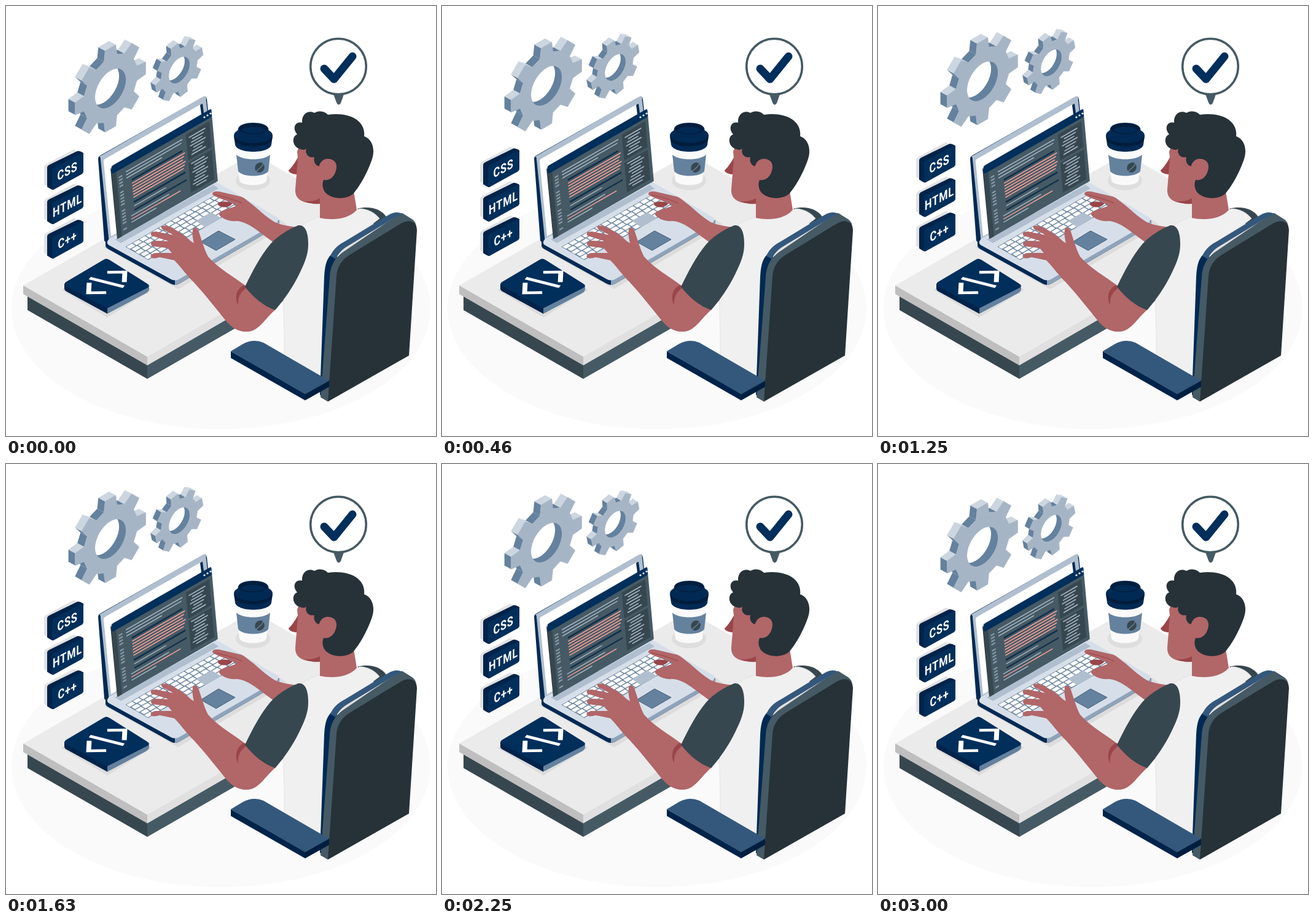
Recreate the animation shown at these times as an HTML page. Size 700 by 700 pixels, loop 3040 ms.

```html
<!DOCTYPE html>
<html lang="en">
<head>
<meta charset="utf-8">
<title>Coding at the desk</title>
<style>
html, body { margin: 0; width: 100%; height: 100%; overflow: hidden; background: #fff; }
svg { display: block; width: 100vw; height: 100vh; }
text { font: 700 21px Roboto, Arial, sans-serif; letter-spacing: 1px; text-anchor: middle; fill: #fff; }
</style>
</head>
<body>
<svg viewBox="0 0 700 700">
  <ellipse cx="350" cy="492" rx="341" ry="197" fill="#fafafa"/>

  <g id="desk">
    <path fill="#37474f" d="M35 470L230 580V607L35 495Z"/>
    <path fill="#455a64" d="M230 580L470 440V469L230 607Z"/>
    <path fill="#ebebeb" d="M28 455L402 240L604 356L230 572Z"/>
    <path fill="#bfbfbf" d="M28 455L230 571V585L28 469Z"/>
    <path fill="#e0e0e0" d="M230 571L604 355V369L230 585Z"/>
  </g>

  <g id="cup">
    <ellipse cx="402" cy="284" rx="28" ry="16" fill="#dedede"/>
    <path fill="#fafafa" d="M373 225L380 284C383 294 421 294 424 284L431 225Z"/>
    <path fill="#64819e" d="M375 242C385 252 420 252 430 242L427 269C420 279 385 279 378 269Z"/>
    <ellipse cx="413" cy="263" rx="7.5" ry="8.5" fill="#37474f" transform="rotate(30 413 263)"/>
    <path d="M407 270C411 264 414 266 419 257" fill="none" stroke="#64819e" stroke-width="1.5"/>
    <path fill="#002a54" d="M371 211C371 193 434 193 434 211L432 226C428 241 377 241 373 226Z"/>
    <path fill="#001d3c" d="M371 211C377 227 428 227 434 211L433 218C427 232 378 232 372 218Z"/>
    <path fill="#002a54" d="M376 211L378 199C382 187 423 187 427 199L429 211C425 221 380 221 376 211Z"/>
    <ellipse cx="402.500" cy="200" rx="23" ry="9" fill="#001d3c"/>
    <path fill="#002a54" d="M383 202C388 195 417 195 422 202C418 209 388 209 383 202Z"/>
  </g>

  <g id="laptop">
    <path fill="#dcdcdc" d="M158 392L280 461L458 357L440 343Z"/>
    <path fill="#002a54" d="M150 249Q150 245 154 243L321 148Q326 146 327 152L342 290L166 388L160 382Z"/>
    <path fill="#b0bfcf" d="M154 250Q153 247 157 245L320 151Q325 149 326 155L341 290L168 386Z"/>
    <path fill="#b0bfcf" d="M152 245L320 148Q326 146 326 152L323 155L156 250Z"/>
    <path fill="#fff" d="M159 254Q158 251 161 249L317 160L334 285L171 375Z"/>
    <path fill="#002a54" d="M316 161L320 159L323 182L319 184Z"/>
    <path fill="#002a54" d="M162 384V391Q163 394 167 396L268 452Q275 456 282 452L440 360Q445 357 445 349Z"/>
    <path fill="#8fa3b9" d="M275 443V454Q279 454 282 452L440 360Q445 357 445 349Z"/>
    <path fill="#d6dfe9" d="M168 379L337 288Q342 286 347 289L440 343Q447 348 440 353L283 444Q275 449 267 444L167 389Q162 385 168 379Z"/>
    <path fill="#b0bfcf" d="M177 380L338 291L346 297L187 386Z"/>
    <g id="keys" transform="matrix(.866 -.5 .866 .5 196 392)"><rect x="-1" y="-1" width="173" height="43" fill="#7189a3"/></g>
    <path fill="#b0bfcf" d="M309 350L334 336L350 345L324 360Z"/>
    <path fill="#64819e" stroke="#455f7a" d="M317 384L346 366L373 380L342 398Z"/>
    <path fill="#263238" d="M170 264L175 268L185 376L181 379Z"/>
    <g id="screen" transform="matrix(1 -.577 .09 1 172 270)">
      <rect width="163" height="109" fill="#455a64"/>
      <rect y="-9" width="163" height="13" rx="3" fill="#002f5c"/>
    </g>
    <g fill="#fff"><circle cx="323" cy="181" r="1.600"/><circle cx="328" cy="178" r="1.600"/><circle cx="333" cy="175" r="1.600"/></g>
  </g>

  <g id="tile">
    <path fill="#dcdcdc" d="M90 462L165 416L238 462L165 507Z"/>
    <path fill="#00234a" d="M95 452V460Q95 463 99 465L165 501V485Z"/>
    <path fill="#64819e" d="M165 491L233 453V461Q233 464 229 467L165 501Z"/>
    <path fill="#002f5c" d="M98 449L159 413Q163 410 168 413L230 452Q235 456 230 459L165 492L98 456Q93 452 98 449Z"/>
    <path transform="matrix(.866 -.5 .866 .5 164 450)" d="M-17 -16L-34 0L-17 16M-9 -23L9 23M17 -16L34 0L17 16" fill="none" stroke="#fff" stroke-width="6.500"/>
  </g>

  <g id="floating"></g>

  <g id="person">
    <path fill="#b16668" d="M490 362C466 359 452 358 440 353C424 345 406 326 398 321C391 315 386 311 381 310L347 302Q335 301 336 307Q344 313 366 319L375 325C365 330 355 331 349 335Q344 339 350 343C356 348 366 351 374 350C386 350 398 357 410 366L437 386L470 400Z"/>
    <path fill="#9a4549" d="M346 320Q357 316 369 321C364 328 355 329 348 326Q343 323 346 320Z"/>
    <path d="M340 307C355 311 373 315 384 321" fill="none" stroke="#9a4549" stroke-width="1.200"/>
    <path fill="#37474f" d="M572 330C592 325 610 330 619 343L600 356Z"/>
    <path fill="#f0f0f0" stroke="#e0e0e0" stroke-width=".8" d="M470 362L500 347L511 343C530 349 560 346 575 330C590 330 602 338 608 346L550 390L520 430L513 615L453 580V540C453 515 451 490 452 470Z"/>
    <path fill="#b16668" d="M392 457C370 440 345 427 329 408C322 395 318 378 313 365Q308 357 304 363C303 372 304 379 306 386L301 383C291 373 276 363 262 358Q249 356 254 363L273 373L244 367Q232 368 237 374L266 383L243 382Q232 385 238 391L263 394L270 402L243 402Q232 405 237 410Q242 412 250 409L274 414C285 425 295 440 305 449C320 465 340 490 356 510C370 528 385 533 400 529C415 524 425 505 440 493Z"/>
    <path fill="#9a4549" d="M388 454C376 459 371 474 378 487C377 475 381 466 391 459Z"/>
    <path fill="#37474f" d="M476 357C488 356 492 370 492 388C492 405 486 418 478 435C467 458 453 478 438 495C420 489 402 474 389 457C400 434 414 407 430 388C443 373 463 362 476 357Z"/>
    <path fill="#b16668" d="M478 226L474 237L475 247Q468 260 460 268Q462 273 473 274L471 298C470 313 480 319 494 321L511 321V345C530 349 557 348 571 332L565 295L530 225Z"/>
    <path fill="#9a4549" d="M475 247Q468 260 460 268Q462 273 473 274ZM486 318Q500 319 511 313V322Q496 323 486 318Z"/>
    <path fill="#263238" d="M479 233C465 229 465 212 474 209C465 199 471 187 482 190C481 175 493 169 502 174C512 169 519 172 524 177C558 172 586 186 583 212C597 217 601 234 596 249C589 270 577 292 565 306C551 317 526 314 518 301C514 293 515 286 518 282L510 261C504 260 500 254 502 246C493 248 486 241 489 232C486 235 482 234 479 233Z"/>
    <path fill="#b16668" d="M509 263C511 253 518 248 526 249C536 250 540 258 537 268C534 279 526 285 517 283C511 280 508 272 509 263Z"/>
  </g>

  <g id="chair">
    <path fill="#002a54" d="M511 633L518 441C519 420 523 410 531 403L548 415L526 642Z"/>
    <path fill="#455a64" d="M524 644L512 637L527 441C528 424 534 411 548 401L620 352L645 337L661 347Q668 351 668 362L600 420Z"/>
    <path fill="#34587c" d="M528 407C533 395 541 389 552 383L623 340C631 335 639 335 645 338L622 351L556 391C546 397 541 403 537 412Z"/>
    <path fill="#263238" d="M524 644L538 440C539 425 546 414 558 406L643 354C657 346 669 351 669 365L656 569Z"/>
    <path fill="#00234a" d="M366 562L487 631V642L366 573Z"/>
    <path fill="#001f40" d="M487 631L526 609V620L487 642Z"/>
    <path fill="#34587c" d="M366 562L386 550Q403 541 419 548L526 610L487 632Z"/>
  </g>

  <g id="bubble">
    <path fill="#455a64" d="M532 141H551L545 158Q541 164 538 157Z"/>
    <circle cx="541" cy="98.500" r="45.300" fill="#fff" stroke="#455a64" stroke-width="3.500"/>
    <path d="M518 102L534 119L564 82" fill="none" stroke="#002f5c" stroke-width="13" stroke-linecap="round" stroke-linejoin="round"/>
  </g>
</svg>
<script>
const $ = id => document.getElementById(id);

function add(parent, name, attrs, content) {
  const el = document.createElementNS('http://www.w3.org/2000/svg', name);
  for (const key in attrs) el.setAttribute(key, attrs[key]);
  if (content) el.textContent = content;
  parent.append(el);
  return el;
}

const polygon = points => 'M' + points.map(p => p.map(n => n.toFixed(2)).join(' ')).join('L') + 'Z';
const floating = $('floating');

function gear(cx, cy, radius, hole, depthX, depthY, turn) {
  const project = ([u, v]) => [cx + .866 * u, cy - .5 * u + v];
  const shift = ([x, y]) => [x + depthX, y + depthY];
  const root = radius * .76, points = [], kinds = [];
  for (let i = 0; i < 8; i++) {
    const a = i * Math.PI / 4 + turn;
    const corner = (r, da) => points.push([r * Math.cos(a + da), r * Math.sin(a + da)]);
    corner(root, -.24); kinds.push('side');
    corner(radius, -.15); kinds.push('tip');
    corner(radius, .15); kinds.push('side');
    corner(root, .24); kinds.push('rim');
  }
  points.forEach((p, i) => {
    const q = points[(i + 1) % points.length];
    const length = Math.hypot(q[0] - p[0], q[1] - p[1]);
    const nx = (q[1] - p[1]) / length, ny = (p[0] - q[0]) / length;
    if (nx + ny >= 0) return;
    const light = kinds[i] !== 'rim' && ny < -.65;
    const a = project(p), b = project(q);
    add(floating, 'path', { d: polygon([a, b, shift(b), shift(a)]), fill: light ? '#ccd6e0' : '#64819e' });
  });
  add(floating, 'path', { d: polygon(points.map(project)), fill: '#a6b5c5', stroke: '#a6b5c5', 'stroke-width': .7 });

  const iso = `matrix(.866 -.5 0 1 ${cx} ${cy})`;
  const clipId = 'hole' + radius;
  add(add(floating, 'clipPath', { id: clipId }), 'circle', { r: hole, transform: iso });
  add(floating, 'circle', { r: hole, fill: '#64819e', transform: iso });
  const inside = add(floating, 'g', { 'clip-path': `url(#${clipId})` });
  add(inside, 'circle', { r: hole, fill: '#fff', transform: `translate(${depthX} ${depthY}) ` + iso });
}

function tag(label, y) {
  const g = add(floating, 'g', { transform: `translate(0 ${y})` });
  const shape = (fill, d) => add(g, 'path', { fill, d });
  shape('#e2e2e2', 'M62 263Q62 259 66 257L109 234Q114 232 115 237V268L68 293L62 290Z');
  shape('#00234a', 'M67 263Q67 260 71 258L116 236Q119 235 126 239V268Q126 272 122 274L77 299Q74 299 67 294Z');
  shape('#002f5c', 'M75 268Q75 265 78 263L122 240Q126 238 126 243V268Q126 272 122 274L79 297Q75 299 75 295Z');
  add(g, 'text', { transform: 'matrix(.78 -.42 0 1 100 275.500)' }, label);
}

function drawKeys() {
  for (let row = 0; row < 5; row++)
    for (let col = 0; col < 14; col++)
      add($('keys'), 'rect', { x: col * 12.2 + (row % 2) * 1.2, y: row * 8.4, width: 10.4, height: 6.7, rx: 1, fill: '#fff' });
}

function drawScreen() {
  const bar = (x, y, width, height, fill) => add($('screen'), 'rect', { x, y, width, height, fill });
  const grey = '#a6b5c5', pink = '#ee9c96', navy = '#12304d';
  bar(0, 4, 7, 105, '#37474f');
  for (let i = 0; i < 18; i++) if (i % 6 !== 4) bar(10, 14 + i * 5, 6, 2.6, '#8798a6');
  [92, 90, 58].forEach((w, i) => bar(22, 12 + i * 5, w, 1.7, grey));
  bar(30, 29, 82, 3, navy);
  for (let i = 0; i < 6; i++) bar(30, 35 + i * 4.6, 86 - i % 3 * 2, 1.9, pink);
  bar(30, 65, 84, 3, navy);
  bar(30, 72, 52, 1.6, grey);
  bar(30, 78, 85, 2.5, navy);
  [62, 80, 40].forEach((w, i) => bar(24, 85 + i * 5, w, 1.7, i === 1 ? pink : grey));
  bar(120, 9, 38, 42, '#37474f');
  bar(120, 55, 38, 48, '#37474f');
  for (let i = 0; i < 16; i++) {
    const indent = i * 5 % 7;
    bar(124 + indent, (i < 7 ? 15 : 24) + i * 4.8, 27 - indent - i * 3 % 8, 1.8, grey);
  }
}

gear(170, 134, 67, 29, -11, -6, 0);
gear(282, 104, 45, 19.5, -8, -5, -.2);
['CSS', 'HTML', 'C++'].forEach((label, i) => tag(label, i * 56));
drawKeys();
drawScreen();

const LOOP = 3040, LEAD = 60, LOW = .8, RISE = 14.2;

function render(time) {
  const phase = (time + LEAD) % LOOP / LOOP;
  const lift = 1 - Math.abs(1 - 2 * phase);
  floating.setAttribute('transform', `translate(0 ${(LOW - RISE * lift).toFixed(3)})`);
}

const start = performance.now();
function tick() {
  render(performance.now() - start);
  requestAnimationFrame(tick);
}
tick();
</script>
</body>
</html>
```
